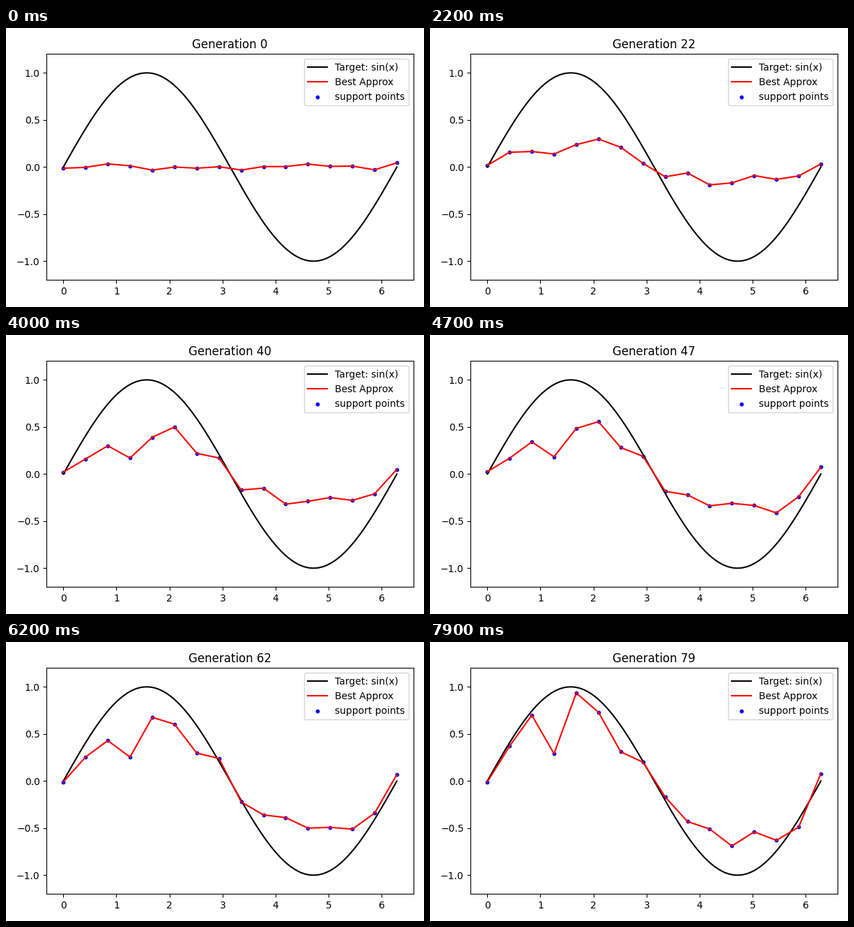
Write a matplotlib script that moves like this. It is 600 by 400 pixels and loops after 8000 ms.

```python
import numpy as np
import matplotlib.pyplot as plt
from matplotlib.animation import FuncAnimation

FRAMES = 80
INTERVAL = 100
MIDWAY = 40    # generation of the middle pose
SPREAD = 0.02  # size of the random first candidate
STEP = 0.012   # random-walk step per generation

MID = [.02, .16, .3, .17, .39, .5, .22, .17,
       -.17, -.15, -.32, -.29, -.25, -.28, -.21, .05]
LAST = [-.01, .37, .7, .29, .935, .73, .31, .2,
        -.17, -.43, -.51, -.69, -.54, -.63, -.49, .08]

rng = np.random.default_rng(4)


def drift(start, end, steps):
    """Random walk that leads from one pose to another."""
    t = np.linspace(0, 1, steps + 1)[:, None]
    walk = np.cumsum(rng.normal(0, STEP, (steps + 1, len(start))), axis=0)
    walk -= walk[0]
    return start + t * (np.subtract(end, start) - walk[-1]) + walk


first = rng.normal(0, SPREAD, len(MID))
best = np.vstack([drift(first, MID, MIDWAY)[:-1],
                  drift(MID, LAST, FRAMES - 1 - MIDWAY)])
xs = np.linspace(0, 2 * np.pi, len(MID))
x = np.linspace(0, 2 * np.pi, 200)

fig, ax = plt.subplots(figsize=(6, 4), dpi=100)
ax.plot(x, np.sin(x), color="black", label="Target: sin(x)")
line, = ax.plot(xs, best[0], color="red", label="Best Approx")
dots = ax.scatter(xs, best[0], s=10, color="blue", label="support points")
title = ax.set_title("Generation 0")
ax.set_ylim(-1.2, 1.2)
ax.legend(loc="upper right")
fig.tight_layout()


def update(gen):
    line.set_ydata(best[gen])
    dots.set_offsets(np.column_stack([xs, best[gen]]))
    title.set_text(f"Generation {gen}")
    return line, dots, title


anim = FuncAnimation(fig, update, frames=FRAMES, interval=INTERVAL,
                     repeat=True, repeat_delay=0)
plt.show()
```
